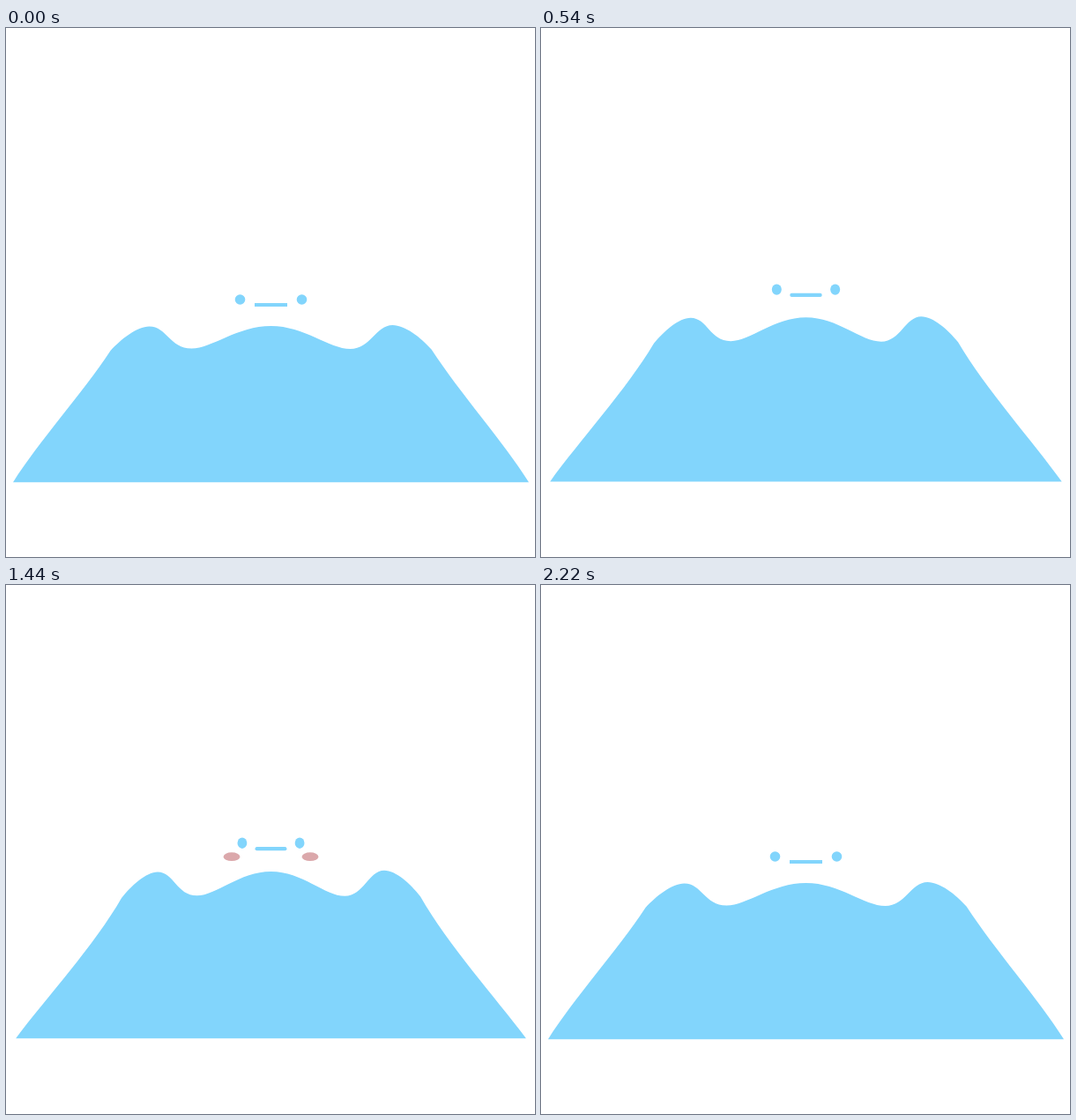
Recreate the animation shown at these times as an HTML page with a canvas. Size 600 by 600 pixels, loop 2.4 s.

```html
<!DOCTYPE html>
<html lang="en">
<head>
<meta charset="utf-8">
<title>Squash and blush</title>
<style>
  html, body { margin: 0; width: 100%; height: 100%; overflow: hidden; background: #fff; }
  canvas { display: block; width: 600px; height: 600px; }
</style>
</head>
<body>
<canvas id="stage" width="600" height="600"></canvas>
<script>
const ctx = document.getElementById('stage').getContext('2d');
const LOOP = 2400, STEP = 30;
const BLUE = '#82d5fc', PINK = '#dba8ab';
const CX = 300.5, FLOOR = 515;

// Eased progress from time a to time b
function ease(t, a, b) {
  const p = Math.min(1, Math.max(0, (t - a) / (b - a)));
  return p * p * (3 - 2 * p);
}

// Vertical stretch: dip, spring up, hold, settle
function stretchAt(t) {
  return 1 - 0.08 * ease(t, 150, 330)
           + 0.193 * ease(t, 330, 660)
           - 0.113 * ease(t, 1185, 1830);
}

function blushAt(t) {
  return ease(t, 990, 1290) - ease(t, 1900, 2220);
}

// Top outline at rest: start point, then cubic segments (x from centre, y up from floor)
const START = [-182, 149];
const OUTLINE = [
  [-170, 162, -152, 176.5, -138, 176.5],
  [-118, 176.5, -115, 151.5, -90, 151.5],
  [-67, 151.5, -38, 177, 0, 177],
  [38, 177, 66, 151, 90, 151],
  [113, 151, 119, 178, 138, 178],
  [152, 178, 170, 164, 182, 150.5]
];

function drawBody(s) {
  const px = x => CX + x / s;
  const py = y => FLOOR - y * s;
  const half = 292.5 - 42 * (s - 1);
  const base = 515.2 - 14 * (s - 1);
  const lean = 29 * s ** 2.5, rise = 46;

  ctx.fillStyle = BLUE;
  ctx.beginPath();
  ctx.moveTo(px(START[0]), py(START[1]));
  for (const [a, b, c, d, e, f] of OUTLINE) {
    ctx.bezierCurveTo(px(a), py(b), px(c), py(d), px(e), py(f));
  }
  ctx.bezierCurveTo(px(215), py(100), CX + half - lean, base - rise, CX + half, base);
  ctx.lineTo(CX - half, base);
  ctx.bezierCurveTo(CX - half + lean, base - rise, px(-215), py(99), px(START[0]), py(START[1]));
  ctx.fill();
}

function drawPair(s, dx, y, rx, ry, color) {
  ctx.fillStyle = color;
  for (const side of [-1, 1]) {
    ctx.beginPath();
    ctx.ellipse(CX + side * dx / s, FLOOR - y * s, rx / s, ry * s, 0, 0, Math.PI * 2);
    ctx.fill();
  }
}

function drawMouth(s) {
  const resting = Math.abs(s - 1) < 1e-6;
  const half = resting ? 18.5 : 17 / s;
  const y = FLOOR - 201 * s;
  ctx.strokeStyle = BLUE;
  ctx.lineWidth = 4 * Math.max(1, s);
  ctx.lineCap = resting ? 'butt' : 'round';
  ctx.beginPath();
  ctx.moveTo(CX - half, y);
  ctx.lineTo(CX + half, y);
  ctx.stroke();
}

function draw(t) {
  const s = stretchAt(t);
  ctx.fillStyle = '#fff';
  ctx.fillRect(0, 0, 600, 600);
  drawBody(s);
  ctx.globalAlpha = Math.max(0, blushAt(t));
  drawPair(s, 47.8, 192.6, 10, 4.6, PINK);
  ctx.globalAlpha = 1;
  drawPair(s, 35, 207, 5.8, 5.8, BLUE);
  drawMouth(s);
}

const began = performance.now();
function tick() {
  const t = (performance.now() - began) % LOOP;
  draw(Math.floor(t / STEP) * STEP);
  requestAnimationFrame(tick);
}
tick();
</script>
</body>
</html>
```
